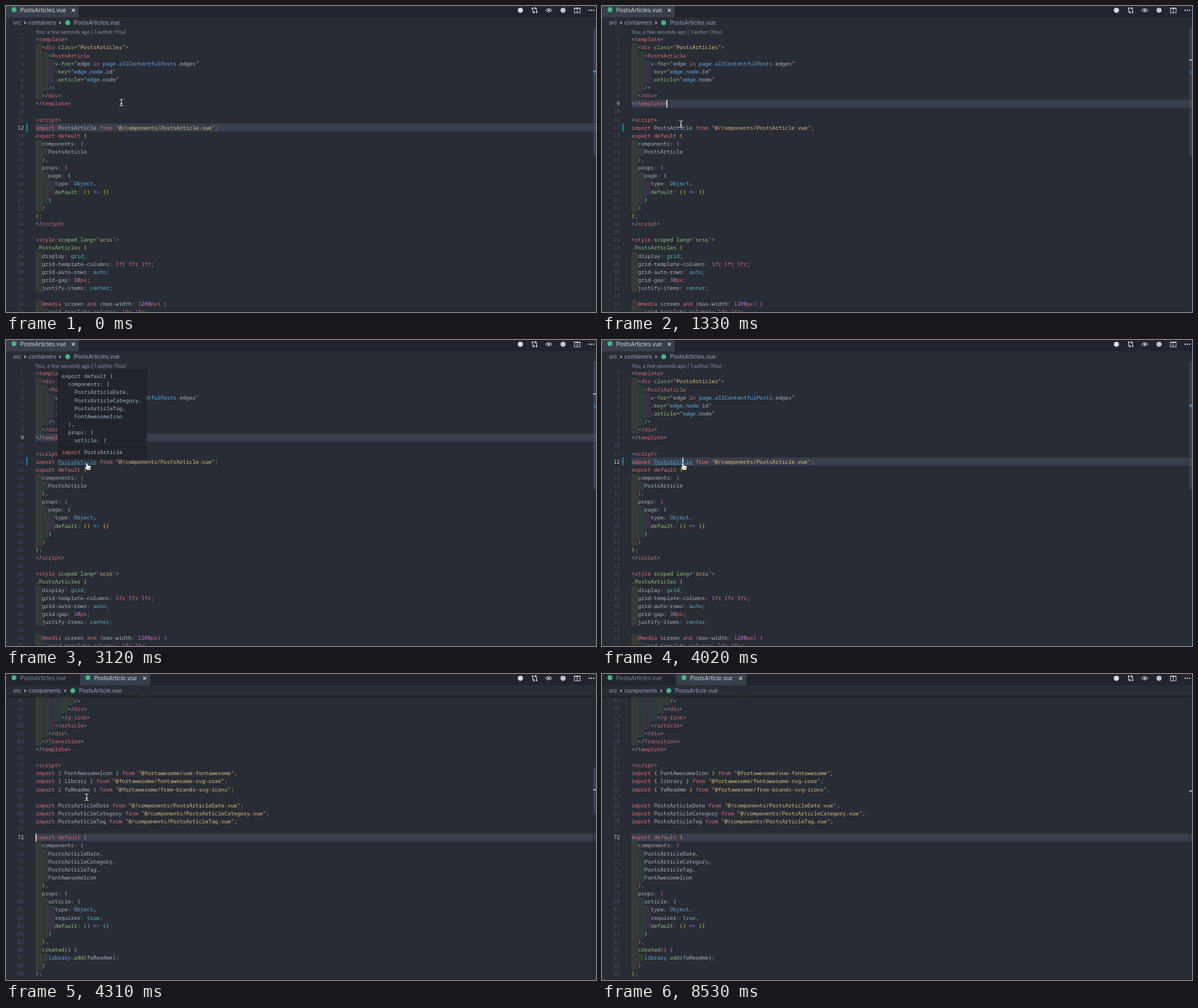
Write an HTML page with a canvas that moves like this. It is 1038 px wide and 539 px high and loops after 8630 ms.

```html
<!DOCTYPE html>
<html lang="en">
<head>
<meta charset="utf-8">
<title>Go to definition</title>
<style>
html, body { margin: 0; width: 100%; height: 100%; overflow: hidden; background: #282c34; }
canvas { display: block; width: 100vw; height: 100vh; }
</style>
</head>
<body>
<canvas id="stage"></canvas>
<script>
const W = 1038, H = 539, LOOP = 8630;
const LEFT = 52, CHAR = 5.635, ROW = 14.12, BASE = 10.3, TOP = 38;
const MONO = '9.39px "Noto Sans Mono", "DejaVu Sans Mono", monospace';
const UI = 'Inter, Roboto, sans-serif';
const COLORS = {
  w: '#abb2bf', r: '#e06c75', g: '#98c379', y: '#e5c07b',
  b: '#61afef', c: '#56b6c2', p: '#c678dd', l: '#4e94ce'
};
const BRACKETS = ['#f0cb1c', '#da70d6', '#87cefa'];
const STRIPES = ['255,255,64', '127,255,127', '255,127,255', '79,236,236'];
const BG = '#282c34', DARK = '#21252b', ACTIVE = '#383e4a', GREEN = '#41b883';

// "~" plus a letter switches the colour
const listPage = `<~rtemplate~w>
  <~rdiv ~gclass~w=~y"PostsArticles"~w>
    <~rPostsArticle
      ~gv-for~w=~y"~wedge ~rin ~bpage~w.~ballContentfulPosts~w.edges~y"
      ~g:key~w=~y"~bedge~w.~bnode~w.id~y"
      ~g:article~w=~y"~bedge~w.node~y"
    />
  </~rdiv~w>
</~rtemplate~w>

<~rscript~w>
~rimport ~wPostsArticle ~rfrom ~y"@/components/PostsArticle.vue"~w;
~rexport default ~w{
  components: {
    PostsArticle
  },
  props: {
    page: {
      type: ~bObject~w,
      ~gdefault~w: () ~b=> ~w{}
    }
  }
};
</~rscript~w>

<~rstyle ~gscoped lang~w=~y'scss'~w>
~g.PostsArticles ~w{
  display: ~cgrid~w;
  grid-template-columns: ~p1~rfr ~p1~rfr ~p1~rfr~w;
  grid-auto-rows: ~cauto~w;
  grid-gap: ~p30~rpx~w;
  justify-items: ~ccenter~w;

  ~r@media ~wscreen ~rand ~w(max-width: ~p1280~rpx~w) {
    grid-template-columns: ~p1~rfr ~p1~rfr~w;`.split('\n');

const itemPage = `              ~g:name~w=~y"article.category"
            />
          </~rdiv~w>
        </~rg-link~w>
      </~rarticle~w>
    </~rdiv~w>
  </~rTransition~w>
</~rtemplate~w>

<~rscript~w>
~rimport ~w{ FontAwesomeIcon } ~rfrom ~y"@fortawesome/vue-fontawesome"~w;
~rimport ~w{ library } ~rfrom ~y"@fortawesome/fontawesome-svg-core"~w;
~rimport ~w{ faReadme } ~rfrom ~y"@fortawesome/free-brands-svg-icons"~w;

~rimport ~wPostsArticleDate ~rfrom ~y"@/components/PostsArticleDate.vue"~w;
~rimport ~wPostsArticleCategory ~rfrom ~y"@/components/PostsArticleCategory.vue"~w;
~rimport ~wPostsArticleTag ~rfrom ~y"@/components/PostsArticleTag.vue"~w;

~rexport default ~w{
  components: {
    PostsArticleDate,
    PostsArticleCategory,
    PostsArticleTag,
    FontAwesomeIcon
  },
  props: {
    article: {
      type: ~bObject~w,
      requirer: ~ctrue~w,
      ~gdefault~w: () ~b=> ~w{}
    }
  },
  ~gcreated~w() {
    ~blibrary~w.~gadd~w(faReadme);
  }
};`.split('\n');

const hoverText = `export default {
  components: {
    PostsArticleDate,
    PostsArticleCategory,
    PostsArticleTag,
    FontAwesomeIcon
  },
  props: {
    article: {`.split('\n');

// time, x, y, shape
const mouseSteps = [
  [0, 203, 170, 'beam'], [900, 197, 175, 'beam'], [1040, 180, 186, 'beam'],
  [1180, 158, 199, 'beam'], [1330, 139, 208, 'beam'], [1480, 139, 211, 'beam'],
  [1630, 141, 213, 'beam'], [1780, 142, 214, 'beam'], [2530, 142, 217, 'beam'],
  [2680, 142, 217, 'hand'], [4160, 142, 217, 'beam'], [6700, 251, 248, 'beam'],
  [6850, 480, 341, 'beam'], [7000, 715, 436, 'beam'], [7150, 920, 518, 'beam'],
  [7290, 0, 0, 'none']
];
const caretFlips = [150, 600, 1040, 1630, 2080, 2530, 2980, 4760, 5210, 5660, 6260, 6700, 7150, 7730, 8180, 8530];

const canvas = document.getElementById('stage');
const ctx = canvas.getContext('2d');
const dpr = window.devicePixelRatio || 1;
canvas.width = Math.round(W * dpr);
canvas.height = Math.round(H * dpr);

function rect(x, y, w, h, color) {
  ctx.fillStyle = color;
  ctx.fillRect(x, y, w, h);
}

function dot(x, y, r, color) {
  ctx.fillStyle = color;
  ctx.beginPath();
  ctx.arc(x, y, r, 0, Math.PI * 2);
  ctx.fill();
}

function label(text, x, y, color, size = 9.8, style = '') {
  ctx.font = `${style} ${size}px ${UI}`;
  ctx.fillStyle = color;
  ctx.fillText(text, x, y);
}

function stroke(d, color, width, x = 0, y = 0) {
  ctx.save();
  ctx.translate(x, y);
  ctx.strokeStyle = color;
  ctx.lineWidth = width;
  ctx.stroke(new Path2D(d));
  ctx.restore();
}

// Draws one line of code and returns the bracket depth after it
function codeLine(line, x, y, depth, paired) {
  ctx.font = MONO;
  let col = 0;
  line.split('~').forEach((part, i) => {
    const color = COLORS[i ? part[0] : 'w'];
    for (const run of (i ? part.slice(1) : part).split(/([{}()])/)) {
      if (!run) continue;
      ctx.fillStyle = color;
      if (/^[{}()]$/.test(run)) {
        const opens = run === '{' || run === '(';
        if (!opens) depth--;
        if (paired) ctx.fillStyle = BRACKETS[depth % 3];
        if (opens) depth++;
      }
      ctx.fillText(run, x + col * CHAR, y);
      col += run.length;
    }
  });
  return depth;
}

function indentStripes(line, y) {
  const levels = line ? line.search(/\S/) / 2 : 0;
  for (let i = 0; i < levels; i++) {
    const x = LEFT + i * 2 * CHAR;
    rect(x, y, 2 * CHAR, ROW, `rgba(${STRIPES[i % 4]},0.07)`);
    rect(Math.round(x), y, 1, ROW, 'rgba(59,64,72,0.6)');
  }
}

function editor(lines, first, top, active, paired) {
  const rowTop = n => top + (n - first) * ROW;
  ctx.save();
  ctx.beginPath();
  ctx.rect(0, TOP, W, H - TOP);
  ctx.clip();
  rect(LEFT, Math.round(rowTop(active)), W - LEFT, 14, ACTIVE);
  let depth = 0;
  lines.forEach((line, i) => {
    const n = first + i, y = rowTop(n);
    indentStripes(line, y);
    ctx.font = MONO;
    ctx.textAlign = 'right';
    ctx.fillStyle = n === active ? '#d0d5de' : '#495162';
    ctx.fillText(n, 31.5, y + BASE);
    ctx.textAlign = 'left';
    depth = codeLine(line, LEFT, y + BASE, depth, paired);
  });
  ctx.restore();
}

function caret(col, y) {
  const x = Math.max(LEFT, LEFT + col * CHAR - 0.6);
  rect(x, y, 1.5, 14, '#ffffff');
}

function closeMark(x) {
  stroke('M-2.6 -2.6L2.6 2.6M2.6 -2.6L-2.6 2.6', '#e4e7ec', 1.3, x, 7.5);
}

function toolbar() {
  const ink = '#d7dae0';
  dot(905, 7.5, 4.6, ink);
  stroke('M-3.5 -2V4M3.5 3V-3H0M2 -5L0 -3L2 -1M-3.5 4H0M-2 2L0 4L-2 6', ink, 1.1, 930, 7);
  dot(926.5, 4, 1.5, ink);
  dot(933.5, 11, 1.5, ink);
  stroke('M-5.5 0Q0 -6 5.5 0Q0 6 -5.5 0Z', ink, 1.1, 955, 7.5);
  dot(955, 7.5, 1.8, ink);
  dot(980, 7.5, 4.6, '#c0c4cc');
  stroke('M-5 -4H5V4.5H-5ZM0 -4V4.5M-5 -3.4H5', ink, 1.1, 1005, 7.5);
  for (let i = -1; i < 2; i++) dot(1030 + i * 4, 7.5, 1.2, ink);
}

function arrow(x) {
  ctx.fillStyle = '#9da5b4';
  ctx.fill(new Path2D(`M${x - 1.6} 26.6L${x + 2} 29.5L${x - 1.6} 32.4Z`));
}

function header(second) {
  const soft = '#9da5b4', bright = '#d7dae0';
  rect(0, 0, W, 20, DARK);
  rect(second ? 130 : 0, 0, second ? 124 : 128, 20, ACTIVE);
  rect(second ? 129 : 128, 0, 1, 20, '#1b1e24');
  dot(14, 6.5, 4.4, GREEN);
  label('PostsArticles.vue', 25, 11, second ? '#7f8796' : bright);
  if (second) {
    dot(144, 6.5, 4.4, GREEN);
    label('PostsArticle.vue', 155, 11, bright, 9.8, 'italic');
  }
  closeMark(second ? 244 : 118.5);
  toolbar();

  label('src', 12.5, 33, soft);
  arrow(34);
  label(second ? 'components' : 'containers', 39.5, 33, soft);
  arrow(second ? 104.5 : 95.5);
  dot(second ? 117.5 : 108.5, 29.5, 4.4, GREEN);
  label(second ? 'PostsArticle.vue' : 'PostsArticles.vue', second ? 128.5 : 119.5, 33, soft);
}

function ruler(t, second, line) {
  rect(1033, TOP, 1, H - TOP, '#20242b');
  const slider = 'rgba(110,120,142,0.27)';
  if (!second) {
    rect(1033, TOP, 5, 226, slider);
    rect(1034, 114, 4, 6, '#1b6a9c');
    rect(1033, line === 9 ? 94 : 114, 5, 2, line === 9 ? '#b4bac5' : '#7d9db4');
    return;
  }
  const late = t >= 4760 ? 2 : 0;
  ctx.globalAlpha = t < 7730 ? 1 : t < 8030 ? 0.65 : t < 8180 ? 0.3 : 0;
  rect(1033, 164 + late, 5, 82 - late, slider);
  ctx.globalAlpha = 1;
  rect(1033, 203 + late, 5, 2, '#b4bac5');
}

function tooltip() {
  rect(91, 53, 156, 156, '#181a1f');
  rect(92, 54, 154, 154, DARK);
  rect(92, 188, 154, 1, '#181a1f');
  hoverText.forEach((line, i) => codeLine(line, 98, 67.2 + i * ROW, 0, false));
  codeLine('~rimport ~wPostsArticle', 98, 201.2, 0, false);
}

function pointer(x, y, shape) {
  if (shape === 'beam') {
    const d = 'M-3.5 -6Q-0.6 -6 0 -4.6Q0.6 -6 3.5 -6M0 -5V5M-3.5 6Q-0.6 6 0 4.6Q0.6 6 3.5 6M-1.8 1.8H1.8';
    stroke(d, 'rgba(20,22,26,0.7)', 2.6, x, y);
    stroke(d, '#f4f5f7', 1.2, x, y);
  } else if (shape === 'hand') {
    const hand = new Path2D('M-1.4 1Q-0.2 -1 1 1L1.6 4Q2.8 3.2 3.6 4.5Q5 3.8 5.6 5Q7 4.6 7.2 6.2Q7.4 9.4 6 12H0.4Q-0.6 9.8 -2.8 8Q-3.8 6.4 -2.2 6.3L-0.4 7.4Z');
    ctx.save();
    ctx.translate(x, y);
    ctx.fillStyle = '#ffffff';
    ctx.strokeStyle = '#14161a';
    ctx.lineWidth = 1.6;
    ctx.stroke(hand);
    ctx.fill(hand);
    ctx.lineWidth = 0.6;
    ctx.stroke(new Path2D('M2 8V10.5M3.8 8V10.5M5.5 8V10.5'));
    ctx.restore();
  }
}

function draw(t) {
  const second = t >= 4160;
  const line = t < 150 ? 12 : t < 4020 ? 9 : second ? 72 : 12;
  const link = t >= 2680 && !second;
  const clicked = t >= 4020 && !second;
  const caretOn = clicked || caretFlips.filter(f => f <= t).length % 2 === 1;

  ctx.setTransform(canvas.width / W, 0, 0, canvas.height / H, 0, 0);
  rect(0, 0, W, H, BG);
  header(second);

  if (second) {
    editor(itemPage, 54, 281 - 18 * ROW, 72, t >= 4460);
    const shade = ctx.createLinearGradient(0, TOP, 0, TOP + 5);
    shade.addColorStop(0, 'rgba(16,18,22,0.6)');
    shade.addColorStop(1, 'rgba(16,18,22,0)');
    rect(0, TOP, W, 5, shade);
    if (caretOn) caret(0, 281);
  } else {
    label('You, a few seconds ago | 1 author (You)', LEFT, 48.6, '#8a92a0', 8.5);
    const wordX = LEFT + 7 * CHAR, wordW = 12 * CHAR;
    if (t >= 1930 && t < 2680) rect(wordX, 207, wordW, 14, 'rgba(38,79,120,0.25)');
    const lines = link
      ? listPage.map((s, i) => i === 11 ? s.replace('~wPostsArticle', '~lPostsArticle') : s)
      : listPage;
    editor(lines, 1, 52, line, true);
    rect(35.5, 207, 2.5, 14, '#1b81a8');
    if (link) rect(wordX, 218.6, wordW, 0.9, COLORS.l);
    if (clicked) caret(16, 207);
    else if (caretOn) caret(11, 165);
  }

  ruler(t, second, line);
  if (t >= 3120 && t < 4020) tooltip();
  rect(0, 538, W, 1, DARK);
  const [, x, y, shape] = mouseSteps.filter(s => s[0] <= t).pop();
  pointer(x, y, shape);
}

const start = performance.now();
function tick() {
  draw((performance.now() - start) % LOOP);
  requestAnimationFrame(tick);
}
tick();
</script>
</body>
</html>
```
